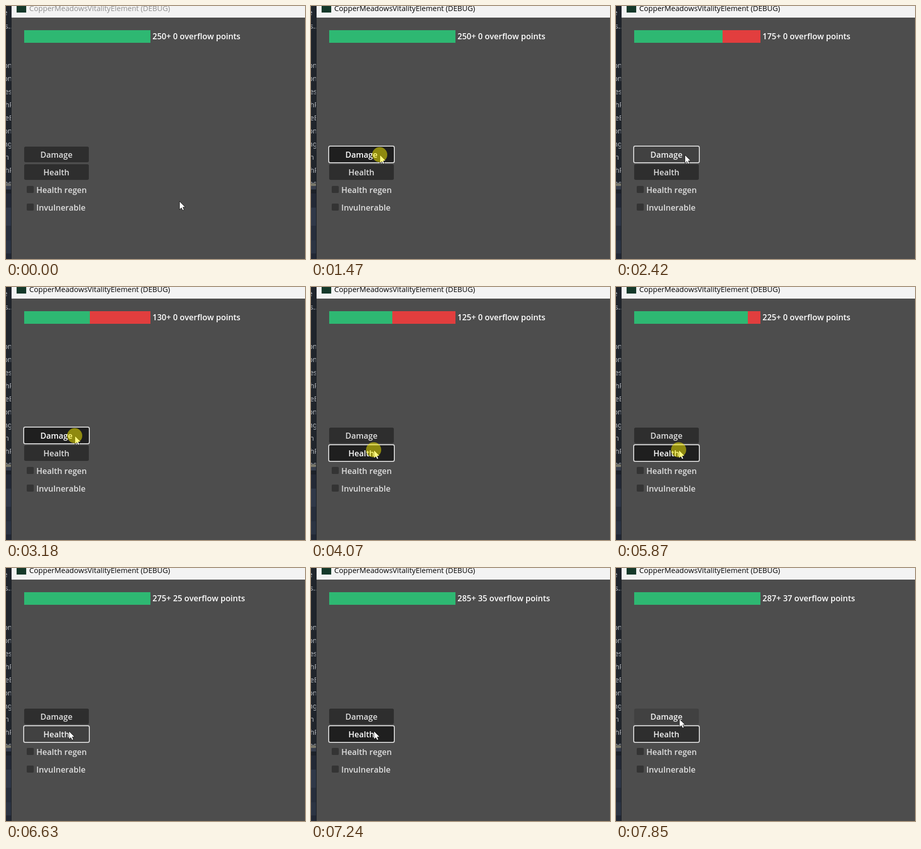
Recreate the animation shown at these times as an HTML page. Size 592 px wide and 502 px high, loop 8 s.

```html
<!DOCTYPE html>
<html lang="en">
<head>
<meta charset="utf-8">
<style>
  html, body { margin: 0; width: 100%; height: 100%; overflow: hidden; background: #4d4d4d; }
  svg { display: block; }
  text { font: 600 16px "Open Sans", "Noto Sans", sans-serif; font-kerning: none; fill: #dfdfdf; white-space: pre; }
  #title { font-weight: 400; font-size: 14.6px; }
  #side text { font: 400 14px "Noto Sans", sans-serif; fill: #b4b7bb; text-anchor: end; }
  .focus { fill: none; stroke: #d3d3d3; stroke-width: 2; }
</style>
</head>
<body>
<svg id="stage" width="592" height="502" viewBox="0 0 592 502">
  <g id="side">
    <rect width="11" height="502" fill="#20252c"/>
    <rect y="352" width="11" height="5" fill="#686a68" id="rule"/>
    <rect y="357" width="11" height="7" fill="#373e4d"/>
    <rect y="364" width="11" height="8" fill="#1c2129"/>
    <rect y="372" width="11" height="28" fill="#232936"/>
    <rect y="400" width="11" height="36" fill="#303848"/>
    <rect y="436" width="11" height="29" fill="#272e3c"/>
    <rect y="465" width="11" height="26" fill="#2c3443"/>
    <rect y="491" width="11" height="11" fill="#222835"/>
  </g>
  <rect x="10" width="1" height="502" fill="#191d23"/>
  <rect x="11" width="581" height="502" fill="#4d4d4d"/>
  <rect x="11" width="581" height="23" fill="#f3f3f3"/>
  <rect x="21" y="-6" width="19" height="19" fill="#15392a"/>
  <text id="title" x="46" y="10">CopperMeadowsVitalityElement (DEBUG)</text>

  <rect x="36" y="48" width="250" height="25" fill="#e23e3e"/>
  <rect id="bar" x="36" y="48" width="250" height="25" fill="#2eb872"/>
  <text id="points" x="290" y="66" style="fill:#fff"></text>

  <g class="button" transform="translate(36 279)">
    <rect width="128" height="31" rx="3"/>
    <text y="22">Damage</text>
    <rect class="focus" x="-1" y="-1" width="130" height="33" rx="3"/>
  </g>
  <g class="button" transform="translate(36 314)">
    <rect width="128" height="31" rx="3"/>
    <text y="22">Health</text>
    <rect class="focus" x="-1" y="-1" width="130" height="33" rx="3"/>
  </g>

  <rect x="41" y="357" width="14" height="14" rx="2" fill="#343434"/>
  <text x="60" y="371">Health regen</text>
  <rect x="41" y="392" width="14" height="14" rx="2" fill="#343434"/>
  <text x="60" y="406">Invulnerable</text>

  <g id="cursor">
    <path d="M.5 .5V17L4.3 13.5 6.8 18.6 9.6 17.4 7.2 12.2H12Z" fill="#fff" stroke="#000" stroke-width=".8"/>
    <circle id="glow" r="15" fill="#fff500" fill-opacity=".5"/>
  </g>
</svg>
<script>
const LOOP = 8000, MAX = 250, CAP = 287.5;
const $ = id => document.getElementById(id);
const set = (el, attrs) => { for (const k in attrs) el.setAttribute(k, attrs[k]); };

// Clipped line endings of the window behind: text, right edge, baseline
const endings = [["e", 3, 18], ["s..", 12, 45],
  ...["on", "on", "es", "hP", "eB", "on", "ng", "h", "hP", "ne"]
    .map((s, i) => [s, s === "h" ? 6 : /[A-Z]/.test(s) ? 15 : 12, 123 + 26 * i])];
for (const [s, x, y] of endings) {
  const el = document.createElementNS("http://www.w3.org/2000/svg", "text");
  el.textContent = s;
  set(el, { x, y });
  $("side").insertBefore(el, $("rule"));
}

// Mouse clicks as [press, release]
const repeat = (n, start, gap) =>
  Array.from({ length: n }, (_, i) => [start + gap * i, start + gap * i + 140]);
const damage = [[1470, 1680], [1750, 1890], [1960, 2070], [2140, 2210], [2280, 2420],
  [2490, 2630], [2700, 2770], [2840, 2980], [3180, 3330]];
const heal = [[3870, 4000], ...repeat(5, 4070, 180), ...repeat(10, 4970, 167),
  [6700, 6910], [7110, 7250], [7310, 7450]];
const clicks = [damage, heal];

// Cursor moves: start, end, from, to
const moves = [
  [600, 1400, [343, 387], [136, 295]],
  [3480, 3670, [136, 295], [124, 323]],
  [7660, 7850, [124, 323], [125, 299]],
];

function cursorAt(t) {
  let pos = moves[0][2];
  for (const [start, end, from, to] of moves) {
    if (t < start) break;
    const p = Math.min(1, (t - start) / (end - start));
    const e = p * p * (3 - 2 * p);
    pos = from.map((v, i) => Math.round(v + (to[i] - v) * e));
  }
  return pos;
}

const buttons = [...document.querySelectorAll(".button")].map(g => g.children);

// Centre the labels on whole pixels
for (const [, label] of buttons)
  set(label, { x: Math.floor((128 - label.getComputedTextLength()) / 2) });

function draw(t) {
  const done = clicks.map(list => list.filter(c => t >= c[1]).length);
  const hp = Math.min(CAP, MAX - 15 * done[0] + 10 * done[1]);
  const extra = Math.max(0, hp - MAX);
  set($("bar"), { width: Math.min(MAX, hp) });
  $("points").textContent = `${Math.floor(hp)}+ ${Math.floor(extra)} overflow points`;

  const active = t >= damage[0][0];
  set($("title"), { style: `fill:${active ? "#000" : "#8f8f8f"}` });
  set($("rule"), { fill: active ? "#77766a" : "#686a68" });

  const [x, y] = cursorAt(t);
  const focused = t >= heal[0][0] ? 1 : active ? 0 : -1;
  let glow = false;
  buttons.forEach(([box, label, ring], i) => {
    const top = 279 + 35 * i;
    const held = clicks[i].find(c => t >= c[0] && t < c[1]);
    const hover = x >= 36 && x < 164 && y >= top && y < top + 31;
    // The highlight goes out just before the button springs back
    if (held) glow = t < Math.max(held[1] - 70, held[0] + 70);
    set(box, { fill: held ? "#1f1f1f" : hover ? "#414141" : "#2e2e2e" });
    set(label, { style: `fill:${held ? "#fff" : hover || focused === i ? "#f2f2f2" : "#dfdfdf"}` });
    set(ring, { visibility: focused === i ? "visible" : "hidden" });
  });
  set($("cursor"), { transform: `translate(${x} ${y})` });
  set($("glow"), { visibility: glow ? "visible" : "hidden" });
}

const begin = performance.now();
function tick() {
  draw((performance.now() - begin) % LOOP);
  requestAnimationFrame(tick);
}
tick();
</script>
</body>
</html>
```
